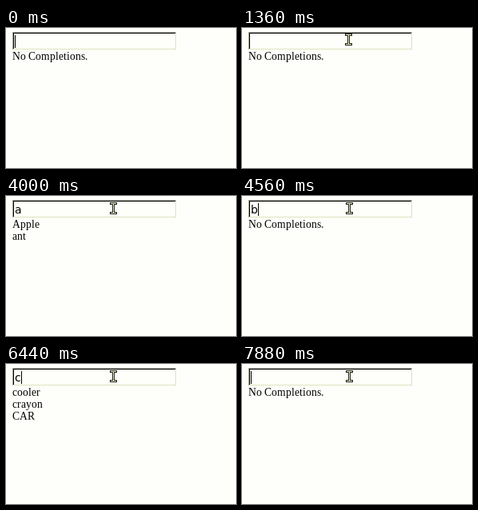
An HTML page with a canvas for the animation above (8000 ms loop, 288 by 176 pixels).

```html
<!DOCTYPE html>
<html lang="en">
<head>
<meta charset="utf-8">
<title>Completion field</title>
<style>
html, body { margin: 0; width: 100%; height: 100%; overflow: hidden; background: #fefefa; }
canvas { display: block; width: 288px; height: 176px; }
</style>
</head>
<body>
<canvas id="stage" width="288" height="176"></canvas>
<script>
const ctx = document.getElementById('stage').getContext('2d');
const LOOP = 8000, STEP = 40;
const PAPER = '#fefefa', PALE = '#e2e2bc';
const INPUT_FONT = '14px "DejaVu Sans", sans-serif';
const LIST_FONT = '13.6px "Liberation Serif", serif';
const WORDS = ['Apple', 'ant', 'bird', 'cooler', 'crayon', 'CAR'];

// When each letter stands in the field
const KEYS = [
  { letter: 'a', from: 2800, to: 4240 },
  { letter: 'b', from: 4560, to: 5960 },
  { letter: 'c', from: 6400, to: 7840 }
];
const CARET_OFF = [[160, 1520], [4000, 4040], [5760, 5960], [7600, 7680]];
const MOVE = { from: 760, to: 1560 };
const REST = { x: 134, y: 15 };

const within = (t, from, to) => t >= from && t < to;

function textAt(t) {
  const key = KEYS.find(k => within(t, k.from, k.to));
  return key ? key.letter : '';
}

function completions(prefix) {
  const hits = prefix ? WORDS.filter(w => w.toLowerCase().startsWith(prefix)) : [];
  return hits.length ? hits : ['No Completions.'];
}

// The pointer rushes up from below, overshoots the top edge and settles on the field.
function pointerAt(t) {
  const k = Math.min(1, (t - MOVE.from) / (MOVE.to - MOVE.from));
  const left = 1 - k;
  return {
    x: Math.round(REST.x - 62 * left ** 3),
    y: Math.round(REST.y + 150 * left ** 2 * Math.cos(6.15 * k)),
    overField: k > 0.7
  };
}

function box(color, x, y, w, h) {
  ctx.fillStyle = color;
  ctx.fillRect(x, y, w, h);
}

// Letters advance by whole pixels.
function writeSnapped(text, x, y) {
  ctx.font = LIST_FONT;
  ctx.fillStyle = '#000';
  for (const ch of text) {
    ctx.fillText(ch, x, y);
    x += Math.round(ctx.measureText(ch).width);
  }
}

function drawField() {
  box('#a4a498', 8, 5, 205, 22);
  box(PALE, 9, 6, 204, 21);
  box('#000', 9, 6, 203, 20);
  box(PAPER, 10, 7, 202, 19);
}

function drawInput(text, caret) {
  ctx.font = INPUT_FONT;
  ctx.fillStyle = '#000';
  ctx.fillText(text, 11, 22);
  if (caret) box('#000', Math.round(11 + ctx.measureText(text).width), 9, 1, 16);
}

function drawArrow(x, y) {
  ctx.save();
  ctx.translate(x + 0.5, y + 0.5);
  const arrow = new Path2D('M0 0V15L3.5 12L6 17L8.5 16L6.3 11H11Z');
  ctx.lineJoin = 'round';
  ctx.lineWidth = 2;
  ctx.strokeStyle = '#f4f4d8';
  ctx.stroke(arrow);
  ctx.fillStyle = '#000';
  ctx.fill(arrow);
  ctx.restore();
}

function drawBeam(x, y) {
  for (const [color, grow] of [['#202018', 1], ['#f0f0c8', 0]]) {
    const part = (dx, dy, w, h) =>
      box(color, x + dx - grow, y + dy - grow, w + 2 * grow, h + 2 * grow);
    part(0, -6, 1, 13);
    for (const end of [-6, 6]) part(-3, end, 7, 1);
  }
}

function draw(t) {
  box(PAPER, 0, 0, 288, 176);
  drawField();
  drawInput(textAt(t), !CARET_OFF.some(([from, to]) => within(t, from, to)));

  // The list follows the field one step later.
  completions(textAt(t - STEP)).forEach((line, i) => writeSnapped(line, 8, 40 + 15 * i));

  if (t >= MOVE.from) {
    const p = pointerAt(t);
    (p.overField ? drawBeam : drawArrow)(p.x, p.y);
  }
}

function frame() {
  const t = performance.now() % LOOP;
  draw(Math.floor(t / STEP) * STEP);
  requestAnimationFrame(frame);
}
frame();
</script>
</body>
</html>
```
